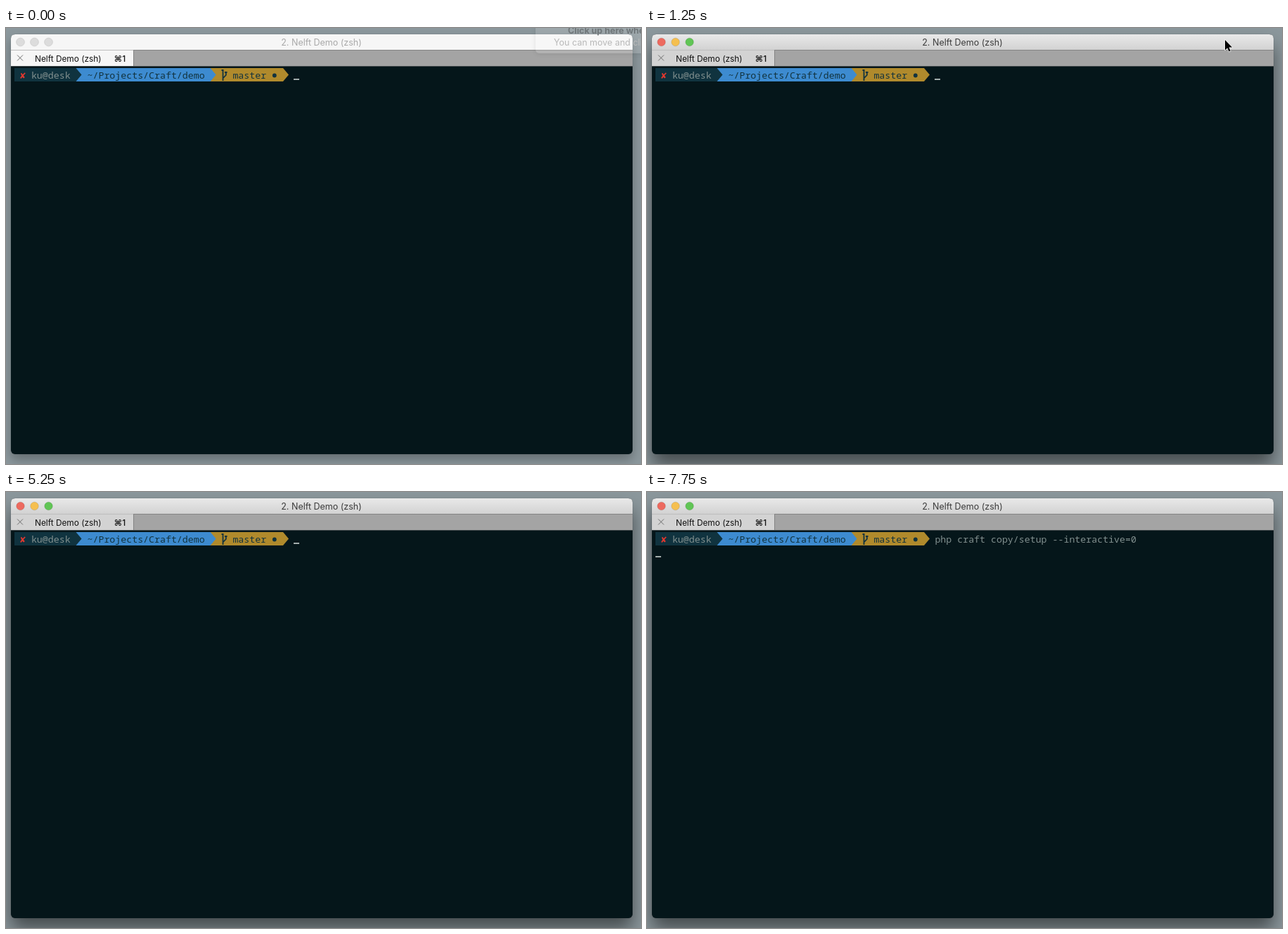
Animation, 903 px wide and 620 px high, one loop 8000 ms. Source, as an HTML page:

```html
<!DOCTYPE html>
<html lang="en">
<head>
<meta charset="utf-8">
<title>Terminal demo</title>
<style>
  html, body { margin: 0; width: 100%; height: 100%; overflow: hidden; background: #8c989d; }
  #stage { position: relative; width: 903px; height: 620px; overflow: hidden; }
  #window {
    position: absolute; left: 7px; top: 9px; width: 884px; height: 597px;
    border-radius: 6px; background: #05161a;
    box-shadow: 0 0 1px rgba(0,0,0,.35), 0 8px 16px rgba(0,0,0,.28);
  }
  .active #window { box-shadow: 0 0 1px rgba(0,0,0,.45), 0 16px 26px rgba(0,0,0,.5); }
  svg { position: absolute; left: 0; top: 0; }
  text { white-space: pre; }
  .ui { font-family: Inter, Roboto, sans-serif; font-size: 12.5px; }
  .tab { font-size: 11.85px; fill: #111; }
  .mono { font-family: "Noto Sans Mono", "DejaVu Sans Mono", monospace; font-size: 13.27px; fill: #82908f; }
  .mono .dark { fill: #12333e; }
  #bar, #tab { fill: #f6f6f6; }
  #title { fill: #a9a9a9; }
  #lights circle { fill: #dcdcdc; stroke: #cbcbcb; stroke-width: .8; }
  .active #bar { fill: url(#chrome); }
  .active #tab { fill: #d3d3d3; }
  .active #title { fill: #3c3c3c; }
  .active #lights circle { fill: var(--c); stroke: rgba(0,0,0,.14); }
  #note {
    position: absolute; left: 753px; top: -30px; width: 180px; height: 66px; border-radius: 5px;
    background: rgba(246,246,246,.16); box-shadow: 0 1px 6px rgba(0,0,0,.1);
  }
</style>
</head>
<body>
<div id="stage">
  <div id="window"></div>
  <svg width="903" height="620" viewBox="0 0 903 620">
    <defs>
      <linearGradient id="chrome" x2="0" y2="1">
        <stop stop-color="#e9e9e9"/><stop offset="1" stop-color="#d2d2d2"/>
      </linearGradient>
    </defs>

    <path id="bar" d="M7 31V15q0-6 6-6H885q6 0 6 6V31z"/>
    <path d="M7 31H891V54H7z" fill="#a4a4a4"/>
    <path id="tab" d="M7 31H181V54H7z"/>
    <path d="M181.5 31V54M181 31.5H891" stroke="#858585"/>
    <path d="M7 31.5H181" stroke="#bdbdbd"/>
    <path d="M7 54.5H891" stroke="#41494b"/>
    <g id="lights">
      <circle cx="20.5" cy="20" r="5.8" style="--c:#ed6a5f"/>
      <circle cx="40.5" cy="20" r="5.8" style="--c:#f5bf4f"/>
      <circle cx="60.5" cy="20" r="5.8" style="--c:#61c555"/>
    </g>
    <text id="title" class="ui" x="448.5" y="24.5" text-anchor="middle">2. Nelft Demo (zsh)</text>
    <path d="M16 38.5l8 8m0-8l-8 8" stroke="#6e6e6e"/>
    <text class="ui tab" x="41" y="47.5">Nelft Demo (zsh)</text>
    <text class="ui tab" x="153.5" y="47.5" font-weight="500">⌘1</text>

    <path d="M290 57H394L402 66.5L394 76H290z" fill="#b08a2c"/>
    <path d="M99 57H290.6L298.6 66.5L290.6 76H99z" fill="#3d8bd0"/>
    <path d="M12 57H99.5L107.5 66.5L99.5 76H12z" fill="#10333f"/>
    <g class="mono">
      <text x="20" y="71.5" style="fill:#e0382f">✘</text>
      <text x="35.9" y="71.5">ku@desk</text>
      <text class="dark" x="115.5" y="71.5">~/Projects/Craft/demo</text>
      <text class="dark" x="322.4" y="71.5">master</text>
      <text id="command" x="409.4" y="71.5">php craft copy/setup --interactive=0</text>
    </g>
    <path d="M308.5 59.5V75M308.5 71.5L312.8 67V62M306.5 60h3M311 63h3.5" fill="none" stroke="#12333e" stroke-width="1.8"/>
    <circle cx="381.8" cy="67.5" r="2.9" fill="#12333e"/>
    <rect id="caret" width="8" height="2" fill="#a3adac"/>
  </svg>

  <div id="note"></div>
  <svg id="noteText" class="ui" width="903" height="620">
    <text x="799" y="8" font-weight="700" fill="#6f7679">Click up here when</text>
    <text x="779" y="24.5" fill="#b9b9b9">You can move and click</text>
  </svg>
  <svg width="903" height="620">
    <path id="pointer" d="M0 0V14.5L3.3 11.4L5.5 16.6L7.8 15.6L5.6 10.6H10.2z"
      fill="#000" stroke="#fff" stroke-width="1.3" stroke-linejoin="round" paint-order="stroke"/>
  </svg>
</div>
<script>
  const LOOP = 8000;
  const byId = id => document.getElementById(id);
  const show = (id, on) => byId(id).style.visibility = on ? "visible" : "hidden";
  const place = (id, x, y) => byId(id).setAttribute("transform", `translate(${x} ${y})`);

  // Pointer tip: start time, x, y
  const steps = [
    [0, 836, -40], [500, 836.5, -11], [750, 822, 5], [1000, 822, 17],
    [3500, 831, -1], [3750, 831, -9], [5000, 829, -14], [5250, 829, -40]
  ];

  function draw(now) {
    const t = now % LOOP;
    const [, x, y] = steps.findLast(step => step[0] <= t);
    place("pointer", x, y);
    show("note", t < 250);
    show("noteText", t < 250);
    byId("stage").classList.toggle("active", t >= 1250);
    show("command", t >= 6500);
    if (t < 6500) place("caret", 409, 72);
    else if (t < 7750) place("caret", 695, 72);
    else place("caret", 12, 91);
  }

  const start = performance.now();
  function tick() {
    draw(performance.now() - start);
    requestAnimationFrame(tick);
  }
  tick();
</script>
</body>
</html>
```
